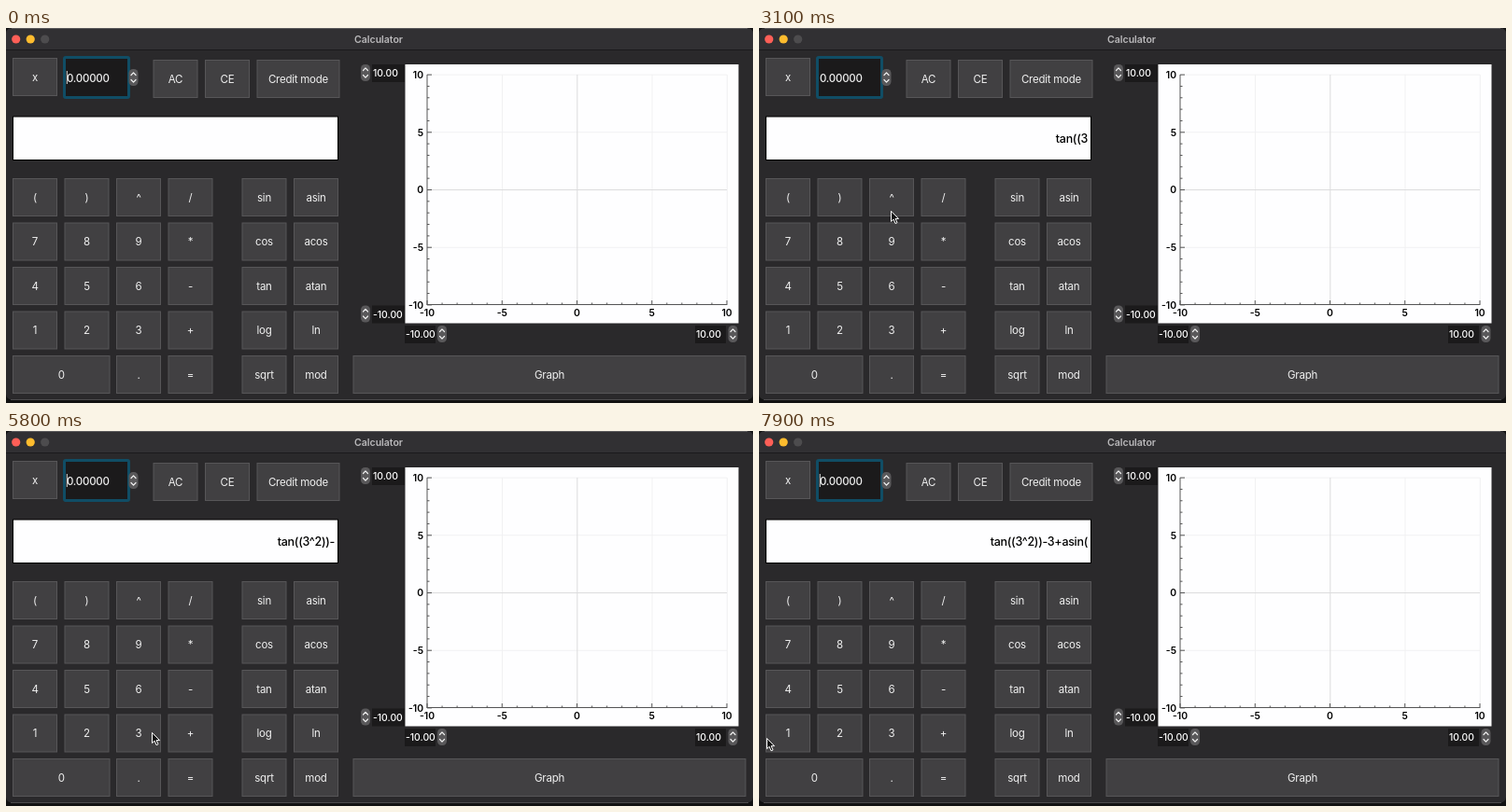
Write an HTML page that moves like this. It is 800x402 px and loops after 8000 ms.

```html
<!DOCTYPE html>
<html lang="en">
<head>
<meta charset="utf-8">
<title>Calculator</title>
<style>
html, body { margin: 0; width: 100%; height: 100%; overflow: hidden; background: #111; }
svg { display: block; width: 800px; height: 402px; }
text { font: 11.5px Inter, Roboto, sans-serif; letter-spacing: -.25px; fill: #f0f0f0; text-anchor: middle; }
.title { font-size: 10.6px; font-weight: 600; letter-spacing: -.05px; fill: #bab9bb; }
.field { font-weight: 500; text-anchor: start; }
.num { font-size: 10.4px; font-weight: 500; letter-spacing: 0; text-anchor: start; fill: #fff; }
.axis { font-size: 10.4px; font-weight: 600; letter-spacing: 0; fill: #000; }
.end { text-anchor: end; }
#display { font-size: 12.5px; font-weight: 500; letter-spacing: -.3px; text-anchor: end; fill: #000; }
</style>
</head>
<body>
<svg id="stage" viewBox="0 0 800 402"></svg>
<script>
const stage = document.getElementById('stage');
const parts = [];
const centers = {};
const rect = (x, y, w, h, fill, more = '') =>
  parts.push(`<rect x="${x}" y="${y}" width="${w}" height="${h}" fill="${fill}" ${more}/>`);
const line = (x1, y1, x2, y2, color) =>
  parts.push(`<path d="M${x1} ${y1}L${x2} ${y2}" stroke="${color}"/>`);
const label = (s, x, y, cls = '') =>
  parts.push(`<text x="${x}" y="${y}" class="${cls}">${s}</text>`);

function button(s, x, y, w = 47) {
  rect(x + .5, y + .5, w, 40, '#414042', 'stroke="#575658"');
  label(s, x + w / 2 + .5, y + 24.7);
  centers[s] = [x + w / 2, y + 20.5];
}

function stepper(x, y) {
  rect(x - 5, y - 9, 10, 18, '#59585a', 'rx="4.5"');
  parts.push(`<path d="M${x - 2.5} ${y - 2.5}l2.5 -2.6l2.5 2.6m-5 5l2.5 2.6l2.5 -2.6" fill="none"
    stroke="#f2f2f2" stroke-width="1.2" stroke-linecap="round" stroke-linejoin="round"/>`);
}

function spinBox(s, x, y, w, stepX) {
  rect(x, y, w, 19, '#1b1a1b');
  label(s, x + 1, y + 13.3, 'num');
  stepper(stepX, y + 9);
}

// Window
rect(0, 0, 800, 398.5, '#2a292b', 'rx="6"');
parts.push('<path d="M0 23.5V6a6 6 0 0 1 6-6H794a6 6 0 0 1 6 6V23.5Z" fill="#313033"/>');
line(6, .5, 794, .5, '#5a595b');
line(0, 23.5, 800, 23.5, '#1b1a1c');
line(5, 398.5, 795, 398.5, '#4c4b4d');
['#fe5f57', '#febc2e', '#4d4c4e'].forEach((color, i) =>
  parts.push(`<circle cx="${10.7 + 15.5 * i}" cy="12" r="4.6" fill="${color}"/>`));
label('Calculator', 399, 15.5, 'title');

// Top row and display
button('x', 7, 32);
rect(62.5, 31.5, 69, 43, '#1b1a1b', 'stroke="#104d65" stroke-width="3" rx="1.5"');
label('0.00000', 65, 57.5, 'field');
stepper(136.5, 53);
button('AC', 157.5, 34);
button('CE', 213, 34);
button('Credit mode', 268.5, 34, 88);
rect(7.5, 95, 348, 46.5, '#fefeff', 'stroke="#000"');

// Keypad: six columns, with a wider gap before the functions
const rows = ['( ) ^ / sin asin', '7 8 9 * cos acos', '4 5 6 - tan atan', '1 2 3 + log ln', '0 . = sqrt mod'];
rows.forEach((row, r) => {
  const names = row.split(' '), wide = names.length < 6;
  names.forEach((s, i) => {
    const col = wide && i ? i + 1 : i;
    button(s, 7 + 55.5 * col + (col > 3 ? 23.5 : 0), 161 + 47.5 * r, wide && !i ? 103.5 : 47);
  });
});
button('Graph', 371.5, 351, 420);

// Plot
const px = v => 611.5 + 16.05 * v, py = v => 173.5 - 12.34 * v;
rect(427.5, 39, 357, 277.5, '#fefeff');
for (const v of [-5, 5, 10, 0]) {
  const color = v ? '#f1f1f2' : '#dcdcdd';
  line(px(v) + .3, 50, px(v) + .3, 297, color);
  line(451, py(v), 772, py(v), color);
}
line(451, 50, 451, 297, '#555');
line(451, 296.5, 772, 296.5, '#555');
for (let v = -10; v <= 10; v++) {
  const len = v % 5 ? 2.5 : 5;
  line(451, py(v), 451 + len, py(v), '#555');
  line(px(v), 297, px(v), 297 - len, '#555');
  if (v % 5 === 0) {
    label(v, px(v), 309, 'axis');
    label(v, 447, py(v) + 3.8, 'axis end');
  }
}
spinBox('10.00', 392, 39, 35, 385);
spinBox('-10.00', 392, 297.5, 35, 385);
spinBox('-10.00', 427, 319, 33, 467);
spinBox('10.00', 738, 319, 33, 778.5);

stage.innerHTML = parts.join('') + `
  <rect id="caret" x="64.8" y="46" width="1" height="14" fill="#ddd"/>
  <text id="display" x="352" y="122.8"></text>
  <path id="pointer" d="M0 0V11.2L2.6 8.8L4.5 13.3L6.5 12.4L4.6 8.2H8Z" fill="#111"
    stroke="#fff" stroke-linejoin="round"/>`;
const [caret, display, pointer] = ['caret', 'display', 'pointer'].map(id => document.getElementById(id));

// Keys visited, the time each is pressed, and where the pointer rests off its center
const enter = 300, travel = 500;
const visits = [
  { key: 'mod', at: 450, dy: -14, hover: true },
  { key: 'tan', at: 1200, dx: 12 },
  { key: '(', at: 2100, dx: -13 },
  { key: '3', at: 2900 },
  { key: '^', at: 3150 },
  { key: '2', at: 3400 },
  { key: ')', at: 4200 },
  { key: ')', at: 4500 },
  { key: '-', at: 5450 },
  { key: '3', at: 6000, dx: 9 },
  { key: '+', at: 6600, dx: -14, dy: -5 },
  { key: 'asin', at: 7350, dx: 13 },
  { key: '1', at: 8000, dx: -22 }
];
const typedBy = v => v.hover ? '' : v.key.length > 1 ? v.key + '(' : v.key;

// After each press the pointer glides to the next key, slowing down, and waits there.
function pointerAt(t) {
  let from = [11, 8], left = enter;
  for (const { key, at, dx = 0, dy = 5.5 } of visits) {
    const to = [centers[key][0] + dx, centers[key][1] + dy];
    if (t < at) {
      const u = Math.min(1, (t - left) / Math.min(travel, at - left));
      const eased = 1 - (1 - u) ** 1.7;
      return from.map((a, i) => a + (to[i] - a) * eased);
    }
    from = to;
    left = at;
  }
  return from;
}

function draw(now) {
  const t = Math.floor(now % 8000 / 100) * 100; // ten pictures a second
  caret.style.opacity = (t + 400) % 1000 < 500 ? 1 : 0;
  display.textContent = visits.filter(v => v.at <= t).map(typedBy).join('');
  pointer.style.opacity = t < enter ? 0 : 1;
  pointer.setAttribute('transform', `translate(${pointerAt(Math.max(t, enter))})`);
  requestAnimationFrame(draw);
}
requestAnimationFrame(draw);
</script>
</body>
</html>
```
